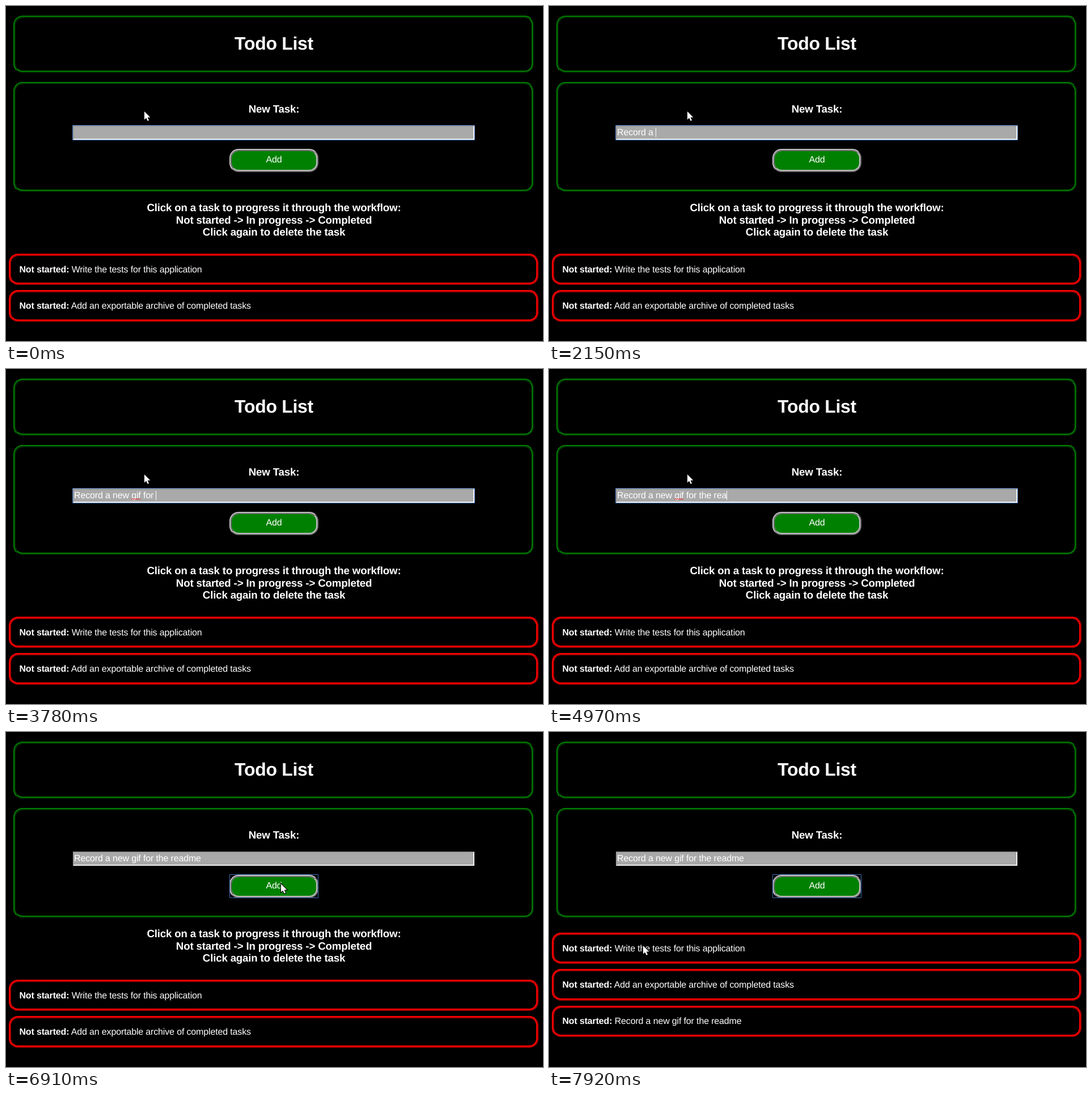
Recreate the animation shown at these times as an HTML page. Size 947 by 591 pixels, loop 8 s.

```html
<!DOCTYPE html>
<html lang="en">
<head>
<meta charset="utf-8">
<title>Todo List</title>
<style>
  html, body { margin: 0; width: 947px; height: 591px; overflow: hidden; background: #000; }
  body {
    position: relative;
    color: #fff;
    font: 16px/17px "Liberation Sans", Arial, sans-serif;
    text-rendering: geometricPrecision;
  }
  body * { box-sizing: border-box; margin: 0; letter-spacing: -.0095em; }
  body > * { position: absolute; }

  .panel { left: 13px; width: 918px; border: 4px ridge green; border-radius: 16px; }
  .head { top: 17px; height: 101px; }
  .form { top: 134px; height: 194px; }

  h1, h3, .hint { left: 0; width: 945px; text-align: center; font-weight: bold; }
  h1 { top: 48px; font-size: 32px; line-height: 36px; }
  h3 { top: 171px; font-size: 18.72px; line-height: 21px; }
  .hint { top: 345px; font-size: 18.72px; line-height: 21.5px; }

  .field {
    left: 118px; top: 211px; width: 708px; height: 25px;
    padding-top: 2px;
    background: #a9a9a9;
    border: 2px inset #eee;
    white-space: pre;
  }
  .caret { position: absolute; top: 2px; width: 1px; height: 16px; margin-left: -.4px; background: #fff; }
  .typo { left: 221px; top: 228px; }

  .add {
    left: 394px; top: 252px; width: 157px; height: 41px;
    padding-top: 7px;
    background: green;
    border: 4px ridge #c0c0c0;
    border-radius: 16px;
    text-align: center;
  }
  .ring { border: 1px solid #3f6fb8; border-radius: 1px; }
  .ring.on-field { left: 117px; top: 210px; width: 710px; height: 27px; }
  .ring.on-add { left: 394px; top: 251px; width: 157px; height: 42px; }

  ul { left: 5px; top: 437px; padding: 0; list-style: none; }
  li {
    width: 934px; height: 55.4px; margin-bottom: 9px;
    padding: 15.6px 14.4px;
    border: 4px ridge red;
    border-radius: 16px;
  }

  .pointer { left: 0; top: 0; overflow: visible; }

  /* Hard cuts on one shared 8 s loop */
  .pointer, .caret, .typo, .ring, .hint, ul, .new { animation: 8s step-end infinite; }
  .caret { animation-name: blink; }
  .typo { animation-name: typo; }
  .on-field { animation-name: blur; }
  .on-add { animation-name: focus; }
  .hint { animation-name: leave; }
  ul { animation-name: rise; }
  .new { animation-name: enter; }
  .pointer { animation-name: move; }

  @keyframes blink {
    0% { visibility: hidden }
    3.75% { visibility: visible }
    72.625% { visibility: hidden }
    79.625% { visibility: visible }
    85.5%, 100% { visibility: hidden }
  }
  @keyframes typo {
    0% { visibility: hidden }
    41.375% { visibility: visible }
    86.375%, 100% { visibility: hidden }
  }
  @keyframes blur { 0% { visibility: visible } 86.375%, 100% { visibility: hidden } }
  @keyframes focus { 0% { visibility: hidden } 86.375%, 100% { visibility: visible } }
  @keyframes leave { 0% { visibility: visible } 88.5%, 100% { visibility: hidden } }
  @keyframes enter { 0% { visibility: hidden } 88.5%, 100% { visibility: visible } }
  @keyframes rise { 0% { top: 437px } 88.5%, 100% { top: 354px } }
  @keyframes move {
    0% { transform: translate(244px, 186px) }
    78.625% { transform: translate(371px, 204px) }
    79.625% { transform: translate(466px, 262px) }
    80.625% { transform: translate(504px, 303px) }
    82.5% { transform: translate(503px, 297px) }
    83.5% { transform: translate(498px, 285px) }
    84.5% { transform: translate(491px, 275px) }
    85.5% { transform: translate(486px, 270px) }
    86.375% { transform: translate(485px, 268px) }
    91.25% { transform: translate(468px, 306px) }
    92.25% { transform: translate(398px, 402px) }
    93.25% { transform: translate(296px, 482px) }
    94.25% { transform: translate(212px, 497px) }
    95.25% { transform: translate(168px, 455px) }
    96.25% { transform: translate(158px, 404px) }
    97.125% { transform: translate(165px, 377px) }
    99%, 100% { transform: translate(166px, 377px) }
  }
</style>
</head>
<body>
  <div class="panel head"></div>
  <h1>Todo List</h1>

  <div class="panel form"></div>
  <h3>New Task:</h3>
  <div class="field"><span id="typed"></span><i class="caret"></i></div>
  <svg class="typo" width="17" height="3" fill="none" stroke="#f00">
    <path d="M0 2.5l2-2 2 2 2-2 2 2 2-2 2 2 2-2 2 2"/>
  </svg>
  <div class="ring on-field"></div>
  <div class="add">Add</div>
  <div class="ring on-add"></div>

  <div class="hint">Click on a task to progress it through the workflow:<br>Not started -&gt; In progress -&gt; Completed<br>Click again to delete the task</div>

  <ul>
    <li><b>Not started:</b> Write the tests for this application</li>
    <li><b>Not started:</b> Add an exportable archive of completed tasks</li>
    <li class="new"><b>Not started:</b> Record a new gif for the readme</li>
  </ul>

  <svg class="pointer" width="12" height="18">
    <path d="M0 0V14.5L3.3 11.4 5.7 16.8 8 15.8 5.7 10.5H10.4Z"
      fill="#fff" stroke="#000" stroke-width="2" paint-order="stroke"/>
  </svg>

<script>
  const LOOP = 8000;
  const task = 'Record a new gif for the readme';
  // Time of each keystroke in ms
  const keys = [
    620, 1080, 1540, 1610, 1790, 1900, 2000, 2150, 2150, 2380, 2480, 2630, 2700,
    2930, 3100, 3200, 3310, 3480, 3560, 3630, 3780, 3870, 3950, 4120, 4270,
    4670, 4800, 4970, 5050, 5200, 5280
  ];
  const typed = document.getElementById('typed');
  let start, shown = 0;

  function tick(now) {
    start ??= now;
    const t = (now - start) % LOOP;
    const count = keys.filter(k => k <= t).length;
    if (count !== shown) {
      typed.textContent = task.slice(0, count);
      shown = count;
    }
    requestAnimationFrame(tick);
  }
  requestAnimationFrame(tick);
</script>
</body>
</html>
```
